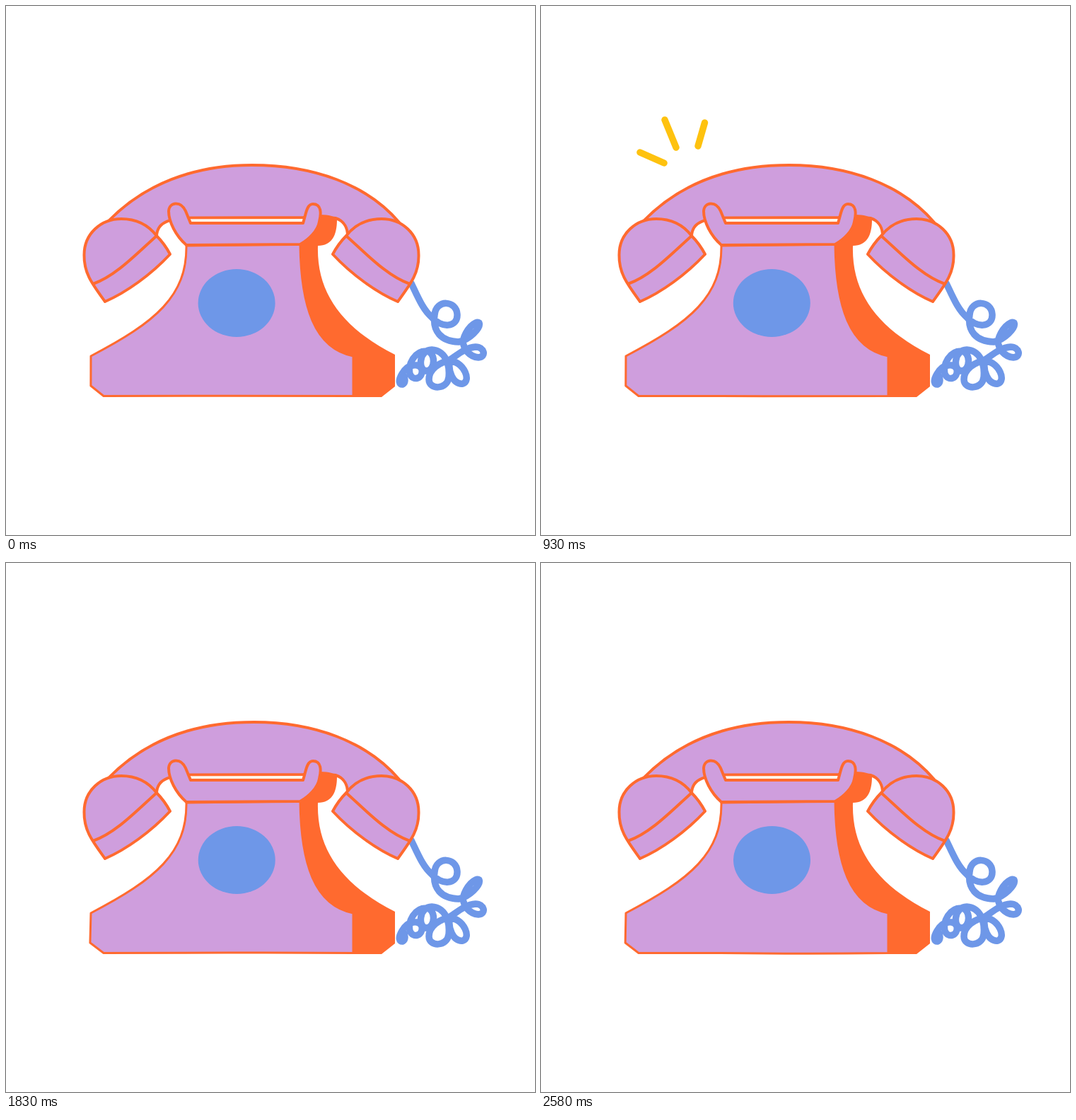
Animation of 748x748 px, one loop 2640 ms. Source, as an HTML page:

```html
<!DOCTYPE html>
<html lang="en">
<head>
<meta charset="utf-8">
<style>
  html, body { margin: 0; width: 100%; height: 100%; overflow: hidden; background: #fff; }
  svg { display: block; width: 100vw; height: 100vh; }
  .part { fill: #cf9edd; stroke: #ff6a2f; stroke-width: 4; stroke-linejoin: round; }
  .line { fill: none; stroke-linecap: round; stroke-linejoin: round; }
  .shade { fill: #ff6a2f; }
  #body { stroke-width: 3; }
</style>
</head>
<body>
<svg viewBox="0 0 748 748">
  <path class="line" stroke="#6e97e8" stroke-width="9.5" d="M573 392C583 413 590 430 602 440C615 456 639 455 638 436C637 416 608 414 606 437C603 460 615 474 640 475C655 472 672 455 669 448C664 444 650 457 646 474C647 485 655 496 668 497C680 496 676 482 664 482C650 483 640 492 628 500C624 515 632 536 646 534C658 530 648 505 630 502C612 502 598 515 598 528C598 543 624 543 626 525C628 505 620 487 602 486C584 486 582 515 594 516C608 516 608 488 594 488C578 488 568 506 571 520C576 532 590 526 588 514C584 504 568 506 560 520C554 530 556 536 561 535C566 532 564 524 560 520"/>
  <path id="handset" class="part"/>
  <path fill="#fff5e8" d="M260 301.5H422V307H260Z"/>
  <path class="shade" d="M440 295Q462 294 468 302C468 324 461 339 441 339C439 405 475 455 550 493V538L531 553H488L430 480L414 337Z"/>
  <path id="body" class="part"/>
  <path class="part" d="M255 338C240 325 230 305 230 290C231 277 247 275 254 290L261 307H420C424 295 425 280 434 280C446 280 446 293 443 305C441 318 428 330 416 337Z"/>
  <g id="ear" class="part">
    <path d="M140 418C122 393 110 378 110.5 352C110.5 322 134 301 163 301C187 301 203 312 213 325Q224 336 232 351C205 380 170 405 140 418Z"/>
    <path fill="none" d="M123 393C155 382 185 350 213 325"/>
  </g>
  <use href="#ear" transform="translate(694) scale(-1 1)"/>
  <ellipse id="dial" cy="420" rx="54.5" ry="48" fill="#6e97e8"/>
  <g id="rays" class="line" stroke="#fec20f" stroke-width="9.5"></g>
</svg>
<script>
const LOOP = 2640, STEP = 30;
const el = id => document.getElementById(id);
const clamp = v => Math.max(0, Math.min(1, v));
const noise = (n, k) => {
  const s = Math.sin(n * 12.99 + k * 78.23) * 43758.5453;
  return 2 * (s - Math.floor(s)) - 1;
};

// base x, y, tip x, y, growth start, shrink start
const rays = [
  [222, 198, 231.5, 165, 0, 1125],
  [191, 200, 175, 161, 120, 1260],
  [174, 222, 140, 207, 270, 1410]
];

function ray([x, y, tx, ty, grow, shrink], t) {
  const size = clamp((t - grow) / 150) * (1 - clamp((t - shrink) / 180));
  return size ? `<path d="M${x} ${y}L${x + (tx - x) * size} ${y + (ty - y) * size}"/>` : '';
}

function draw(now) {
  const t = Math.floor((now % LOOP) / STEP) * STEP;
  const pose = Math.floor((t + 120) / 150);
  const wob = k => noise(pose, k) * 0.6;
  const top = 350 + wob(1) * 8;
  el('handset').setAttribute('d', `M144 305C195 252 265 225 ${top} 225C435 225 510 252 556 306L483 325C483 315 479 304 466 300Q454 298 420 299L261 299.5C235 301 214 303 213 325Z`);
  el('body').setAttribute('d', `M255 339C256 410 212 447 120 495L${119.5 + wob(2)} 537L138 551.5Q230 ${551.5 + wob(3)} 314 ${551.5 + wob(4)}T491 551.5V495C436 484 417 425 416 337Z`);
  el('dial').setAttribute('cx', 326.3 + wob(5) * 0.6);
  el('rays').innerHTML = rays.map(r => ray(r, t)).join('');
}

const start = performance.now();
function tick() {
  draw(performance.now() - start);
  requestAnimationFrame(tick);
}
tick();
</script>
</body>
</html>
```
